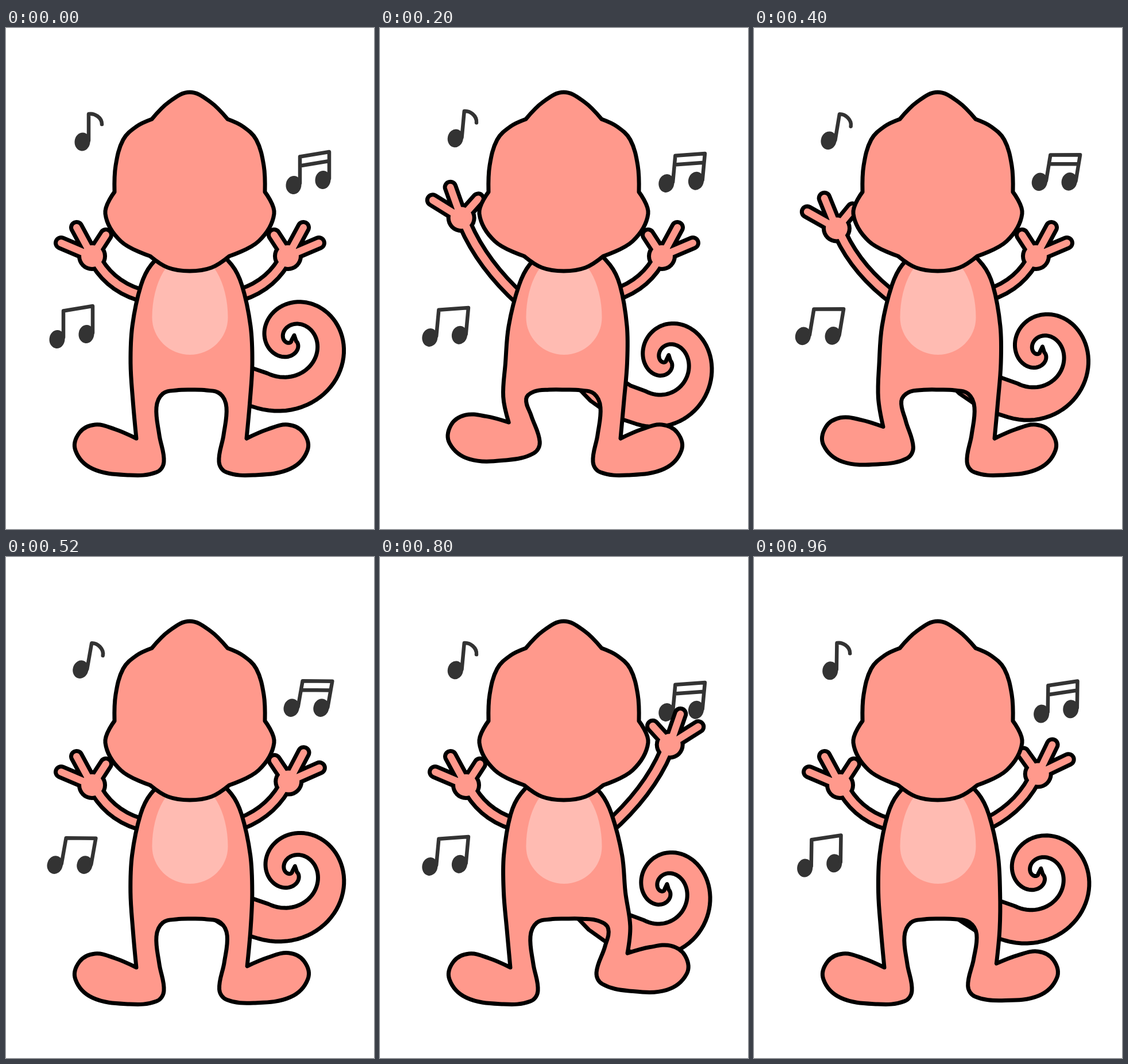
Animation, 641 px wide and 874 px high, one loop 1000 ms. Source, as an HTML page with a canvas:

```html
<!DOCTYPE html>
<html lang="en">
<head>
<meta charset="utf-8">
<title>Dancing chameleon</title>
<style>
html, body { margin: 0; width: 100%; height: 100%; overflow: hidden; background: #fff; }
canvas { display: block; }
</style>
</head>
<body>
<canvas id="stage" width="641" height="874"></canvas>
<script>
const ctx = document.getElementById('stage').getContext('2d');
const W = 641, H = 874, LOOP = 1000, STEP = 40;
const SKIN = '#ff998c', BELLY = '#ffbbb2', INK = '#000', NOTE = '#333';
const { PI, sin, cos, abs, min, max, hypot } = Math;
const AXIS = 323;

// Key points of symmetric half outlines; a trailing 1 marks a sharp corner.
const HEAD = mirror(320, [
  [320, 112], [356, 129], [386, 159, 1], [413, 172], [436, 195], [449, 240],
  [451, 286, 1], [467, 324], [440, 372], [389, 398, 1], [358, 418], [320, 424]
]);
const BODY = mirror(AXIS, [
  [AXIS, 372], [290, 380], [253, 413], [235, 449], [220, 520], [217, 585],
  [221, 650], [227, 716, 1], [190, 700], [155, 692], [128, 706], [121, 737],
  [151, 769], [215, 780], [262, 775], [275, 757], [267, 710], [262, 662],
  [273, 638], [297, 632], [AXIS, 631]
]);

function mirror(axis, half) {
  const other = half.slice(1, -1).reverse().map(([x, y, c]) => [2 * axis - x, y, c]);
  return [...half, ...other];
}

// Closed curve through the points, with tangents parallel to the neighbours' chord.
function smooth(pts) {
  const n = pts.length, at = i => pts[(i + n) % n];
  const handle = (i, len) => {
    const [x, y, corner] = at(i), a = at(i - 1), b = at(i + 1);
    const k = corner ? 0 : 0.36 * len / hypot(b[0] - a[0], b[1] - a[1]);
    return [x + k * (b[0] - a[0]), y + k * (b[1] - a[1])];
  };
  ctx.beginPath();
  ctx.moveTo(pts[0][0], pts[0][1]);
  for (let i = 0; i < n; i++) {
    const p = at(i), q = at(i + 1);
    const len = hypot(q[0] - p[0], q[1] - p[1]);
    ctx.bezierCurveTo(...handle(i, len), ...handle(i + 1, -len), q[0], q[1]);
  }
  ctx.closePath();
}

function paint() {
  ctx.fillStyle = SKIN;
  ctx.strokeStyle = INK;
  ctx.lineWidth = 7;
  ctx.fill();
  ctx.stroke();
}

// Quarter-sine rise to the peak, quarter-sine fall after it.
function lift(t, start, peak, end) {
  if (t <= start || t >= end) return 0;
  return t < peak ? sin(PI / 2 * (t - start) / (peak - start))
                  : cos(PI / 2 * (t - peak) / (end - peak));
}

// Each raised foot turns and rises; the leg follows, the torso leans.
function body(left, right) {
  smooth(BODY.map(([x, y, corner]) => {
    const k = min(1, max(0, (y - 600) / 100));
    const w = k * k * (3 - 2 * k) * min(1, abs(x - AXIS) / 40);
    const lean = 8 * (left - right) * min(1, max(0, (620 - y) / 180));
    const onLeft = x < AXIS, a = w * (onLeft ? left : right);
    const dx = onLeft ? 0.16 * (y - 735) : 9 - 0.15 * (y - 738);
    const dy = onLeft ? -18 - 0.16 * (x - 150) : -14 + 0.15 * (x - 495);
    return [x + lean + a * dx, y + a * w * dy, corner];
  }));
  paint();
}

// Two spirals around one centre bound the tail; n counts quarter turns.
function tail(t) {
  const u = t % 500 / 500;
  const drop = Math.pow(sin(PI * u), 1.15);
  const sway = (t >= 500 ? 5 * sin(2 * PI * u) : 0) - 1.5 * drop;
  const to = (x, y) => ctx.lineTo(
    519.5 + (x - 519.5) * (1 - 0.14 * drop) + sway,
    y + drop * (40 - 0.055 * (y - 475)));
  const spin = (n, r) => to(497 + r * sin(n * PI / 2), 545 + r * cos(n * PI / 2));

  ctx.beginPath();
  to(300, 565);
  to(323, 599);
  to(345, 620);
  to(388, 648);
  for (let n = -0.3; n < 4.9; n += 0.05) spin(n, 121 * Math.pow(0.745, n) - 0.17 * n ** 3);
  to(502, 536);
  for (let n = 4.1; n > -0.4; n -= 0.05) spin(n, 63 * Math.pow(1 - n / 4.2, 1.3));
  to(425, 592);
  to(380, 565);
  ctx.closePath();
  paint();
}

function arm(a, sway) {
  const px = 150 - sway * a, py = 398 - 72 * a;
  const c = cos(0.165 * a), s = sin(0.165 * a);
  const turn = (x, y) => [px + c * x - s * y, py + s * x + c * y];
  const tips = [[-54, -23], [-27, -50], [24, -37]];
  for (const [color, limb, finger, palm] of [[INK, 27, 26, 26], [SKIN, 13, 12, 19]]) {
    ctx.strokeStyle = ctx.fillStyle = color;
    ctx.lineWidth = limb;
    ctx.beginPath();
    ctx.moveTo(...turn(8, 10));
    ctx.quadraticCurveTo(187 - sway * a, 456 - 46 * a, 246, 469 + 6 * a);
    ctx.stroke();
    ctx.lineWidth = finger;
    ctx.beginPath();
    for (const tip of tips) {
      ctx.moveTo(px, py);
      ctx.lineTo(...turn(...tip));
    }
    ctx.stroke();
    ctx.beginPath();
    ctx.arc(px, py, palm, 0, 2 * PI);
    ctx.fill();
  }
}

function belly() {
  ctx.fillStyle = BELLY;
  ctx.beginPath();
  ctx.ellipse(320.5, 505, 66, 65, 0, 0, PI);
  ctx.ellipse(320.5, 505, 66, 112, 0, PI, 2 * PI);
  ctx.fill();
}

function noteHead(x, y) {
  ctx.beginPath();
  ctx.ellipse(x, y, 13.5, 16, 0.1, 0, 2 * PI);
  ctx.fill();
}

function single() {
  noteHead(-12, 18.5);
  ctx.beginPath();
  ctx.moveTo(-1, 16);
  ctx.lineTo(-1, -30);
  ctx.bezierCurveTo(9, -32, 22, -24, 22, -12);
  ctx.stroke();
}

function pair(beams) {
  noteHead(-32, 24.5);
  noteHead(19, 15.5);
  ctx.beginPath();
  ctx.moveTo(-21, 21);
  ctx.lineTo(-21, -25);
  ctx.lineTo(30, -33.5);
  ctx.lineTo(30, 13);
  if (beams > 1) {
    ctx.moveTo(-21, -9);
    ctx.lineTo(30, -17.5);
  }
  ctx.stroke();
}

// Note shapes are drawn relative to their pivot.
function note(x, y, angle, shape) {
  ctx.save();
  ctx.translate(x, y);
  ctx.rotate(angle);
  ctx.strokeStyle = ctx.fillStyle = NOTE;
  ctx.lineWidth = 6.5;
  shape();
  ctx.restore();
}

function hop(t, at) {
  const d = abs(t - at) / 100;
  return d < 1 ? -5 * cos(PI / 2 * d) : 0;
}

function draw(t) {
  const left = lift(t, 0, 265, 520);
  const right = lift(t, 505, 770, 1000);
  const tilt = 0.175 * Math.pow(sin(PI * t / LOOP), 1.2);

  ctx.fillStyle = '#fff';
  ctx.fillRect(0, 0, W, H);
  ctx.lineCap = ctx.lineJoin = 'round';

  note(145, 180 + hop(t, 190), tilt, single);
  note(533, 249.5 + hop(t, 520), tilt, () => pair(2));
  note(121, 518.5, tilt, () => pair(1));

  tail(t);
  arm(left, 9);
  ctx.save();
  ctx.translate(W, 0);
  ctx.scale(-1, 1);
  arm(right, 14);
  ctx.restore();
  body(left, right);
  belly();
  smooth(HEAD);
  paint();
}

const begin = performance.now();
function tick() {
  const t = (performance.now() - begin) % LOOP;
  draw(Math.floor(t / STEP) * STEP);
  requestAnimationFrame(tick);
}
tick();
</script>
</body>
</html>
```
